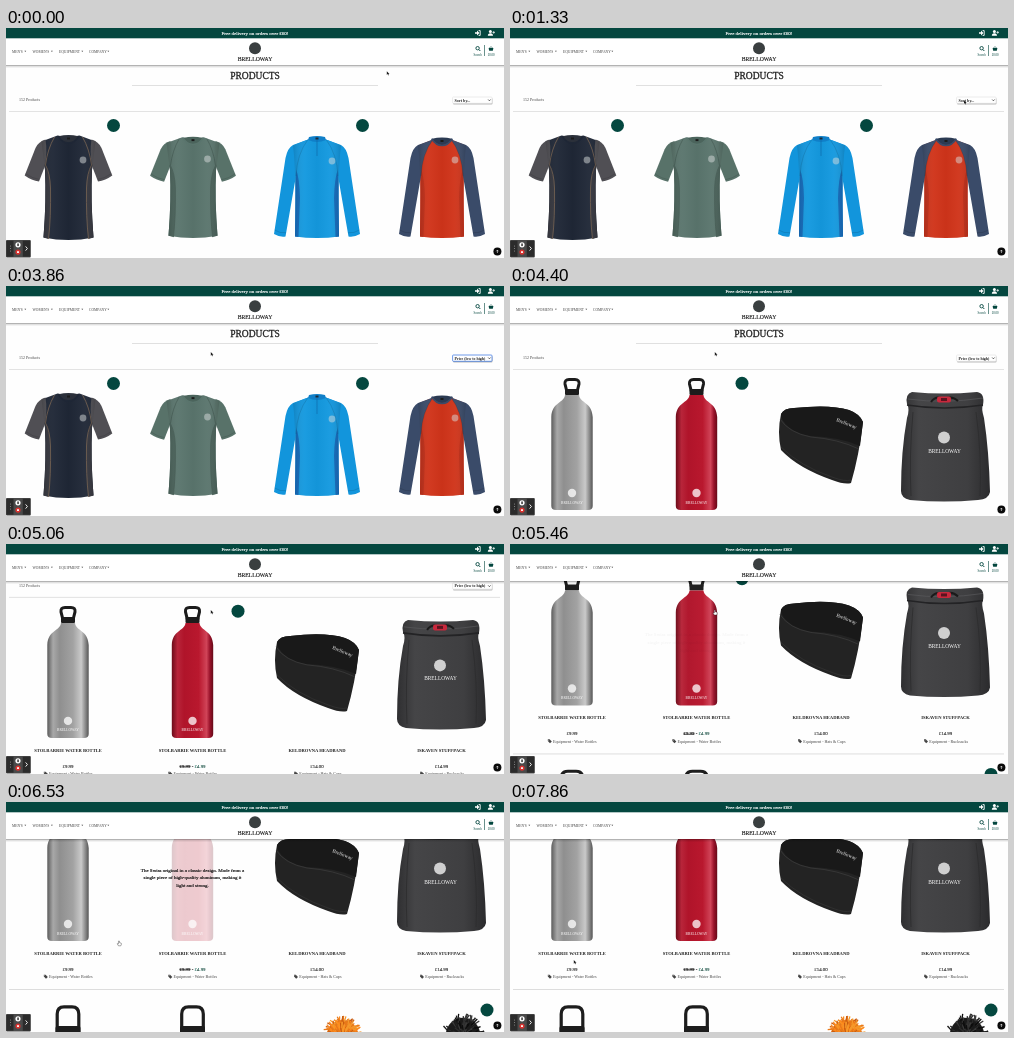
Write an HTML page that moves like this. It is 498 px wide and 230 px high and loops after 8 s.

```html
<!DOCTYPE html>
<html lang="en">
<head>
<meta charset="utf-8">
<title>Products</title>
<style>
  html, body { margin: 0; width: 100%; height: 100%; overflow: hidden; background: #fff; }
  svg { display: block; width: 100vw; height: 100vh; }
  text { font-family: "Liberation Serif", "Times New Roman", serif; white-space: pre; }
</style>
</head>
<body>
<svg id="stage" viewBox="0 0 498 230"></svg>
<script>
const GREEN = '#04473f', INK = '#222', BRAND = 'BRELLOWAY';
const COLS = [62, 186.5, 311, 435.5];

// ---- markup helpers
const text = (x, y, size, str, { fill = INK, anchor = 'middle', bold = 0, more = '' } = {}) =>
  `<text x="${x}" y="${y}" font-size="${size}" fill="${fill}" text-anchor="${anchor}" font-weight="${bold ? 700 : 400}" ${more}>${str}</text>`;
const medium = (x, y, size, str, fill = INK) =>
  text(x, y, size, str, { fill, more: `stroke="${fill}" stroke-width="${size * .03}"` });
const path = (d, fill, more = '') => `<path d="${d}" fill="${fill}" ${more}/>`;
const line = (d, stroke, w = 1, more = '') => path(d, 'none', `stroke="${stroke}" stroke-width="${w}" ${more}`);
const rect = (x, y, w, h, fill, more = '') => `<rect x="${x}" y="${y}" width="${w}" height="${h}" fill="${fill}" ${more}/>`;
const disc = (x, y, r, fill, more = '') => `<circle cx="${x}" cy="${y}" r="${r}" fill="${fill}" ${more}/>`;
const at = (x, y, body, more = '') => `<g transform="translate(${x} ${y})" ${more}>${body}</g>`;
const both = body => body + `<g transform="scale(-1 1)">${body}</g>`;
const badge = (x, y) => disc(x, y, 6.5, GREEN);
const grad = (id, stops, dir = 'x2="1" y2="0"') => `<linearGradient id="${id}" x1="0" y1="0" ${dir}>` +
  stops.map(([o, c, a = 1]) => `<stop offset="${o}" stop-color="${c}" stop-opacity="${a}"/>`).join('') + '</linearGradient>';

function seeded(seed) {
  return () => (seed = (seed * 16807) % 2147483647) / 2147483647;
}

const defs = '<defs>' +
  grad('steel', [[0, '#5c5c5c'], [.14, '#a8a8a8'], [.3, '#8f8f8f'], [.62, '#a2a2a2'], [.82, '#c9c9c9'], [.92, '#8a8a8a'], [1, '#555']]) +
  grad('ruby', [[0, '#6d0c1a'], [.14, '#b8253a'], [.3, '#b0142a'], [.65, '#b9182e'], [.84, '#d04458'], [.92, '#99122a'], [1, '#650a18']]) +
  grad('fold', [[0, '#000', .12], [.25, '#fff', .03], [.5, '#000', .03], [.75, '#fff', .03], [1, '#000', .12]]) +
  grad('pack', [[0, '#2f2f31'], [.2, '#454547'], [.75, '#3f3f41'], [1, '#2b2b2d']]) +
  grad('drop', [[0, '#000', .42], [.35, '#000', .14], [1, '#000', 0]], 'x2="0" y2="1"') +
  '</defs>';

// ---- garments, drawn around x = 0
const TEE_BODY = 'M-11 107.5Q0 110 11 107.5L27 113.5Q25 130 23.5 142Q22 172 25 209.5Q0 214.5 -25 209.5Q-22 172 -23.5 142Q-25 130 -27 113.5Z';
const TEE_SLEEVE = 'M-23 111.5Q-30 113.5 -33 120L-43.8 147.5Q-37 152.5 -29.5 153.5L-23.5 138Q-21 124 -23 111.5Z';
const TEE_SIDE = 'M-24 136Q-18.5 145 -18 160Q-17.5 190 -20 211L-25 209.5Q-22 172 -23.5 142Z';
const LONG_BODY = 'M-9 111.5Q0 114 9 111.5L24 117.5Q20.5 145 22 208.5Q0 211.5 -22 208.5Q-20.5 145 -24 117.5Z';
const LONG_SLEEVE = 'M-9 111.5L-24 117Q-29.5 120 -31.5 130L-43 206Q-37 209.5 -31.5 208.5L-21 148Q-20 126 -9 111.5Z';
const chestMark = (x, y) => disc(x, y, 3.4, '#d8dcdc', 'opacity=".5"');

// crew collar: narrow band around a shallow opening
const crew = (band, inside) => path('M-10 108.2Q0 105.6 10 108.2Q6 114.5 0 114.5Q-6 114.5 -10 108.2Z', inside) +
  line('M-10.4 108.2Q-6 115 0 115Q6 115 10.4 108.2', band, 1.6) + rect(-1.5, 109.5, 3, 2, '#1b1b1b');

function tee(body, sleeve, side, seam, inside) {
  return path(TEE_BODY, body) + both(path(TEE_SLEEVE, sleeve) + path(TEE_SIDE, side) +
    line('M-14 109Q-21 121 -23 137Q-18.5 145 -18 160Q-17.5 190 -20 211', seam, .8) +
    line('M-43 145.5Q-36 150.5 -29 151.5', '#0003', .6)) +
    path(TEE_BODY, 'url(#fold)') + crew(body, inside);
}

function longSleeve(body, sleeve, side) {
  return path(LONG_BODY, body) + both(path('M-21.3 140Q-17.5 150 -17 170L-18.5 209L-22 208.5Q-21.5 165 -21.3 140Z', side) +
    path(LONG_SLEEVE, sleeve) + line('M-9 111.5Q-20 126 -21 148', '#0003', .6) +
    line('M-42.4 202Q-37 205.5 -31 204.7', '#0003', .6)) +
    path(LONG_BODY, 'url(#fold)');
}

const zipTop = longSleeve('#1499df', '#1295dc', '#1268b8') +
  path('M-9 112L-8 109Q0 107 8 109L9 112Q0 116 -9 112Z', '#107fc8') + rect(-1.5, 109.5, 3, 2, '#1b2a3a') +
  line('M0 112V128', '#0f6cae', .7);
const raglan = longSleeve('#d0341a', '#3a4b69', '#bd2d17') + at(0, 2.5, crew('#3a4b69', '#2b3a52'));

const shirts =
  at(62.5, 0, tee('#1f2736', '#504f54', '#34353d', '#77614f', '#2b303a') + chestMark(14.5, 132)) +
  at(187, 6, tee('#5a756d', '#587269', '#496159', '#445b53', '#4b645c'), 'transform-origin="0 0"').replace('translate(187 6)', 'translate(187 5.5) scale(.98 .965)') +
  chestMark(201.5, 131) +
  at(311, 0, zipTop + chestMark(15, 133)) +
  at(436, 0, raglan + chestMark(13, 132)) +
  badge(107.5, 97.5) + badge(356.5, 97.5);

// ---- accessories
function bottle(paint) {
  return line('M-5 106L-7 98Q-7.5 93.5 -3 93.5H3Q7.5 93.5 7 98L5 106', '#1c1c1c', 3) +
    rect(-7, 103, 14, 6, '#1c1c1c', 'rx="1"') +
    path('M-7 109C-8 117 -20 116 -20.7 131V220Q-20.7 224 -16 224H16Q20.7 224 20.7 220V131C20 116 8 117 7 109Z', `url(#${paint})`) +
    disc(0, 207, 4.2, '#fff', 'opacity=".75"') + text(0, 217.5, 3.6, BRAND, { fill: '#fff' });
}

const headband =
  path('M271 128Q274 122 284 122Q320 118 339 124Q350 128 353 136Q349 170 341 197Q335 199 322 194Q288 182 271 164Q267 146 271 128Z', '#232323') +
  path('M271 131Q278 146 300 150Q330 151 350 160L353 136Q350 128 339 124Q320 118 284 122Q274 122 271 128Z', '#191919') +
  line('M270 133Q279 147 301 151Q328 153 349 163', '#3b3b3b', .8) +
  line('M271 161Q290 180 322 191Q335 196 341 194', '#383838', .6) +
  text(0, 0, 5.2, 'Brelloway', { fill: '#eee', more: 'transform="translate(336 139) rotate(22)"' });

const stuffpack =
  path('M397 118Q395 108 402 106Q434 109 467 106Q475 107 473 119Q471 122 474 132Q479 165 480 206Q479 213 468 214Q434 217 400 214Q391 212 391 205Q391 165 397 132Q400 123 397 118Z', 'url(#pack)') +
  line('M397 119Q434 125 473 119', '#232325', 1.6) + line('M398 113Q434 118 473 112', '#5a5a5c', .7) +
  line('M403 126Q399 170 401 210M466 126Q472 170 470 210', '#2c2c2e', .8) +
  line('M421 116Q426 109 434 113Q442 109 448 115', '#1a1a1a', 2) +
  rect(427, 110.5, 14, 6, '#c8283c', 'rx="2"') + rect(431, 112, 6, 3, '#5b1420') +
  disc(434, 151.5, 6, '#f2f2f2', 'opacity=".8"') + text(434.5, 166.5, 5.4, BRAND, { fill: '#fff' });

const flask = line('M-10.8 320V297Q-10.8 289.8 -4 289.8H4Q10.8 289.8 10.8 297V320', '#1d1d1d', 3.2) +
  rect(-12.5, 309, 25, 14, '#1d1d1d', 'rx="2"');

function pompom(x, y, r, colours, seed) {
  const rnd = seeded(seed);
  let out = disc(x, y, r * .8, colours[0]);
  for (let i = 0; i < 170; i++) {
    const a = rnd() * 6.283, r0 = rnd() * r * .75, r1 = Math.min(r, r0 + r * (.2 + rnd() * .25)), b = a + (rnd() - .5) * .4;
    const p = (q, w) => `${(x + q * Math.cos(w)).toFixed(1)} ${(y + q * Math.sin(w)).toFixed(1)}`;
    out += line(`M${p(r0, a)}L${p(r1, b)}`, colours[i % colours.length], 1.3);
  }
  return out;
}

// ---- captions
const tag = (x, y) => at(x, y, path('M0 0H1.8L4 2.2L2.2 4L0 1.8Z', '#444') + disc(.9, .9, .35, '#fff'));
function caption(col, name, price, kind, tagX) {
  const x = COLS[col];
  return text(x, 237.8, 4.6, name, { bold: 1 }) + text(x, 254, 4.9, price, { more: 'stroke="#222" stroke-width=".08"' }) +
    tag(tagX, 257.8) + text(tagX + 5.2, 261.4, 4.1, 'Equipment - ' + kind, { fill: '#444', anchor: 'start' });
}
const blurb = ['The Swiss original in a classic design. Made from a',
  'single piece of high-quality aluminum, making it', 'light and strong.']
  .map((s, i) => medium(186.5, 154.5 + i * 7.8, 5, s, '#111')).join('');
const salePrice = '<tspan font-weight="700" text-decoration="line-through">£9.99</tspan> - <tspan fill="#12806a">£4.99</tspan>';

const gear =
  at(62, 0, bottle('steel')) + at(186.5, 0, bottle('ruby'), 'id="faded"') + badge(232, 97.3) +
  `<g id="blurb">${blurb}</g>` + headband + stuffpack +
  caption(0, 'STOLBARRIE WATER BOTTLE', '£9.99', 'Water Bottles', 37.8) +
  caption(1, 'STOLBARRIE WATER BOTTLE', salePrice, 'Water Bottles', 162.3) +
  caption(2, 'KELDROVNA HEADBAND', '£14.00', 'Hats &amp; Caps', 288) +
  caption(3, 'ISKAVEN STUFFPACK', '£14.99', 'Rucksacks', 414) +
  line('M3 272.5H494', '#d5d5d5', .8) +
  at(62, 0, flask) + at(186.5, 0, flask) +
  pompom(336.5, 319, 20, ['#e8791a', '#f59a2c', '#c95c10', '#ff8a1c'], 7) +
  pompom(457, 318, 21.5, ['#1b1b1b', '#2e2e2e', '#0d0d0d', '#3a3a3a'], 19) + badge(481, 293);

// ---- page furniture
const pageTop =
  medium(249, 51, 9.5, 'PRODUCTS') + line('M126 57.5H372', '#d9d9d9', .8) +
  text(13, 73.4, 4, '152 Products', { anchor: 'start', fill: '#444' }) +
  rect(447, 70, 39.5, 6.6, '#0004', 'rx="1"') +
  rect(446.6, 69, 39.4, 6.3, '#fff', 'id="select" rx=".8" stroke-width=".7"') +
  `<text id="choice" x="448.6" y="73.6" font-size="4.1" font-weight="700" fill="${INK}"></text>` +
  line('M482.2 71.5L483.4 72.8L484.6 71.5', INK, .7) + line('M3 83.5H494', '#dcdcdc', .8);

const menu = [[6, "MEN'S", 18.4], [26.4, "WOMEN'S", 45], [53, 'EQUIPMENT', 75.4], [83, 'COMPANY', 101.4]]
  .map(([x, s, c]) => text(x, 24.6, 3.65, s, { anchor: 'start', fill: '#444' }) + path(`M${c} 22.8h1.8l-.9 1.1z`, '#444')).join('');

const header =
  rect(0, 37, 498, 3.2, 'url(#drop)') + rect(0, 10, 498, 27, '#fff') + rect(0, 0, 498, 10.3, GREEN) +
  medium(249, 7, 5, 'Free delivery on orders over £60!', '#fff') +
  path('M469 4.2H471V2.6L473.4 5L471 7.4V5.8H469Z', '#fff') + line('M472.6 2.6H474.2V7.4H472.6', '#fff', .9) +
  disc(484.4, 3.4, 1.5, '#fff') + path('M481.8 7.7Q481.8 5.2 484.4 5.2Q487 5.2 487 7.7Z', '#fff') +
  line('M486.4 4.4H489M487.7 3.1V5.7', '#fff', .7) + menu +
  disc(249, 20.3, 6, '#3a3f40') + medium(249, 33.2, 5.7, BRAND) +
  line('M473 21.6L474.3 23', GREEN, 1) + disc(471.6, 20.2, 1.7, 'none', `stroke="${GREEN}" stroke-width=".9"`) +
  text(471.6, 27.5, 3, 'Search', { fill: GREEN }) + line('M478.5 17V28', GREEN, .6) +
  path('M482.6 20H487.4L486.8 22.8H483.2Z', GREEN) + line('M483.6 20.2L484.5 18.6M486.4 20.2L485.5 18.6', GREEN, .6) +
  text(485, 27.5, 3, '£0.00', { fill: GREEN });

const widgets =
  rect(0, 212, 24.8, 17.5, '#4a4a4a', 'rx="1"') + rect(.5, 212.7, 7, 16, '#2b2b2b') + rect(16.8, 212.7, 7.4, 16, '#2b2b2b') +
  [218, 220.5, 223].map(y => disc(4.5, y, .5, '#999')).join('') +
  disc(12, 216.8, 2.6, '#fff') + rect(11.3, 215.5, 1.5, 2.6, '#333') +
  disc(12, 224.1, 2.6, '#d8322f') + rect(11.1, 223.2, 1.8, 1.8, '#fff') +
  line('M19.6 218.4L21.4 220.5L19.6 222.6', '#fff', .9) +
  disc(491.4, 223.5, 4, '#0a0a0a') + line('M491.4 225V222.2M490.3 223.3L491.4 222.1L492.5 223.3', '#fff', .6);

const cursor = '<g id="cursor">' +
  path('M0 0V3.7L.9 2.9L1.5 4.2L2.2 3.9L1.6 2.7H2.7Z', '#000', 'id="arrow" stroke="#fff" stroke-width=".2"') +
  path('M-.5 .3Q0 -.5 .5 .3V1.8L2.2 2.3Q2.6 2.6 2.3 4L1.8 5H-.5L-1.8 3Q-1.6 2.3 -.5 3Z', '#fff', 'id="hand" stroke="#222" stroke-width=".4"') + '</g>';

const $ = id => document.getElementById(id);
$('stage').innerHTML = defs + rect(0, 0, 498, 230, '#fefefe') +
  `<g id="page">${pageTop}<g id="shirts">${shirts}</g><g id="gear">${gear}</g></g>` + header + widgets + cursor;

// ---- motion: keys are [ms, value, ...]
const SCROLL = [[4880, 0], [5060, 30], [5260, 55], [5500, 64], [5800, 64], [6020, 82], [6180, 85]];
const POINTER = [[50, 380.8, 43.2], [480, 424, 58], [860, 451, 70], [930, 451, 70], [1060, 453, 71.5], [1200, 453, 71.5], [1330, 454, 72.3],
  [3500, 454, 72.3], [3680, 330, 76], [3860, 204.8, 66], [6220, 204.8, 66], [6400, 150, 112], [6530, 113, 138.8],
  [6660, 108, 141], [7050, 82, 151], [7460, 65, 157], [7530, 65, 157], [7860, 63.8, 158]];

const clamp = v => Math.max(0, Math.min(1, v));
const ramp = (t, from, ms) => clamp((t - from) / ms);
function track(keys, t, i = 1) {
  const n = keys.findIndex(k => k[0] > t);
  if (n === 0) return keys[0][i];
  if (n < 0) return keys[keys.length - 1][i];
  const [a, b] = [keys[n - 1], keys[n]];
  return a[i] + (b[i] - a[i]) * (t - a[0]) / (b[0] - a[0]);
}
const show = (id, on) => $(id).setAttribute('display', on ? 'inline' : 'none');

function draw(t) {
  const sorted = t >= 4400, focus = t >= 2800 && !sorted;
  const hand = t >= 5450 && t < 6600;
  const hover = ramp(t, 5450, 450) - ramp(t, 6520, 450);
  $('page').setAttribute('transform', `translate(0 ${-track(SCROLL, t)})`);
  $('cursor').setAttribute('transform', `translate(${track(POINTER, t, 1)} ${track(POINTER, t, 2)})`);
  $('select').setAttribute('stroke', focus ? '#2f6fe0' : '#e2e2e2');
  $('choice').textContent = t < 3130 ? 'Sort by...' : 'Price (low to high)';
  $('choice').setAttribute('font-size', t < 3130 ? 4.1 : 3.9);
  $('faded').setAttribute('opacity', 1 - .8 * hover);
  $('blurb').setAttribute('opacity', clamp(hover * 1.25));
  show('shirts', !sorted);
  show('gear', sorted);
  show('arrow', !hand);
  show('hand', hand);
}

const start = performance.now();
function tick() {
  draw((performance.now() - start) % 8000);
  requestAnimationFrame(tick);
}
tick();
</script>
</body>
</html>
```
